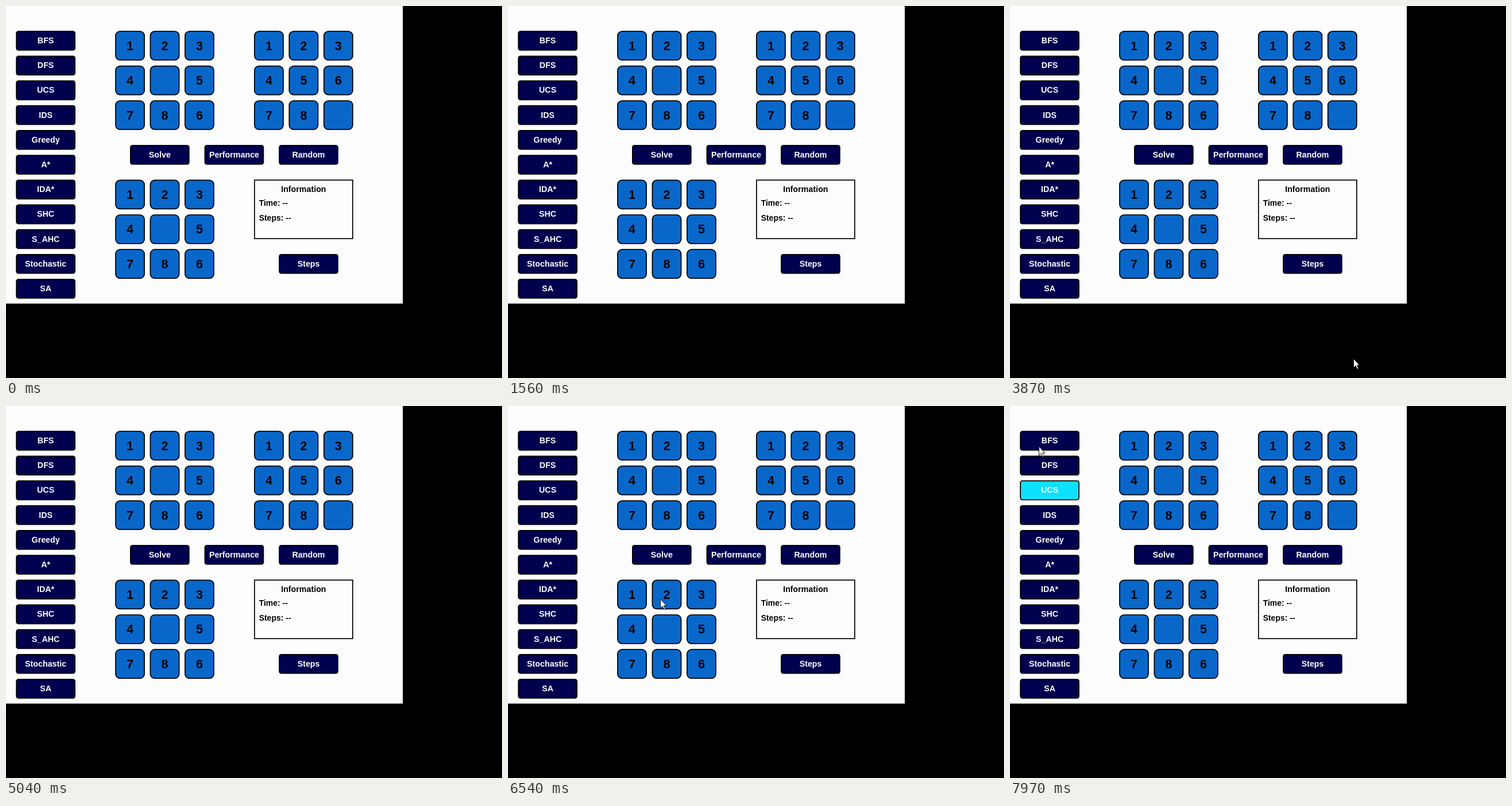
These frames come from a looping animation (864x648 px, 8 s). An HTML page:

```html
<!DOCTYPE html>
<html lang="en">
<head>
<meta charset="utf-8">
<title>Sliding puzzle solver</title>
<style>
  html, body { margin: 0; width: 100%; height: 100%; overflow: hidden; background: #000; }
  svg { display: block; width: 100vw; height: 100vh; }
  text { font-family: "Liberation Sans", Arial, sans-serif; font-weight: bold; }
</style>
</head>
<body>
<svg id="stage" viewBox="0 0 864 648">
  <rect width="864" height="648" fill="#000"/>
  <g id="app" transform="scale(.864)">
    <rect width="800" height="600" fill="#fdfdfd"/>
  </g>
  <path id="cursor" d="M.5 .5V16L4.2 12.7L6.7 18.5L9 17.5L6.6 11.8H11Z"
        fill="#fff" stroke="#000" stroke-width=".9"/>
</svg>
<script>
const LOOP = 8000;
const CLICK = 7300;
const NAVY = '#00004f', CYAN = '#0de1fc', BLUE = '#0967ca';
const app = document.getElementById('app');
const cursor = document.getElementById('cursor');

function add(tag, attrs, content) {
  const el = document.createElementNS('http://www.w3.org/2000/svg', tag);
  for (const key in attrs) el.setAttribute(key, attrs[key]);
  if (content) el.textContent = content;
  app.append(el);
  return el;
}

// The border lies inside the given bounds.
function box(x, y, w, h, r, fill) {
  return add('rect', {
    x: x + 1, y: y + 1, width: w - 2, height: h - 2, rx: r,
    fill, stroke: '#000', 'stroke-width': 2
  });
}

function label(x, y, size, fill, content, anchor = 'middle') {
  add('text', { x, y, fill, 'font-size': size, 'text-anchor': anchor }, content);
}

function button(x, y, name) {
  const el = box(x, y, 120, 40, 4, NAVY);
  label(x + 60, y + 25.2, 16.5, '#fdfdfd', name);
  return el;
}

function board(x, y, tiles) {
  [...tiles].forEach((digit, i) => {
    const tx = x + i % 3 * 70, ty = y + Math.floor(i / 3) * 70;
    box(tx, ty, 60, 60, 9, BLUE);
    if (digit !== '0') label(tx + 30, ty + 38.6, 25, '#000', digit);
  });
}

const methods = ['BFS', 'DFS', 'UCS', 'IDS', 'Greedy', 'A*', 'IDA*', 'SHC', 'S_AHC', 'Stochastic', 'SA']
  .map((name, i) => button(20, 50 + i * 50, name));
const chosen = methods[2];

board(220, 50, '123405786');
board(500, 50, '123456780');
board(220, 350, '123405786');

['Solve', 'Performance', 'Random'].forEach((name, i) => button(250 + i * 150, 280, name));
button(550, 500, 'Steps');

box(500, 350, 200, 120, 0, '#fdfdfd');
label(600, 375, 16.5, '#000', 'Information');
label(510, 402.8, 16.2, '#000', 'Time: --', 'start');
label(510, 432.9, 16.2, '#000', 'Steps: --', 'start');

// Each visit of the pointer: [time, x, y] points.
const visits = [
  [[300, 760, 648], [830, 827, 40], [950, 847, 6]],
  [[2500, 552, 500], [2850, 559, 582], [3400, 559, 582], [3800, 598, 614], [4250, 598, 614], [4700, 826, 648]],
  [[5350, 864, 497], [5870, 758, 450], [6500, 265, 336], [6680, 265, 336], [7220, 50, 142], [7500, 50, 142], [7920, 50, 70], [LOOP, 50, 70]]
];

const ease = u => u * u * (3 - 2 * u);

function pointerAt(t) {
  const path = visits.find(v => t >= v[0][0] && t <= v[v.length - 1][0]);
  if (!path) return null;
  const i = path.findIndex(p => p[0] >= t);
  if (i < 1) return path[0].slice(1);
  const [t0, x0, y0] = path[i - 1], [t1, x1, y1] = path[i];
  const u = ease((t - t0) / (t1 - t0));
  return [x0 + (x1 - x0) * u, y0 + (y1 - y0) * u];
}

function draw(t) {
  const pos = pointerAt(t);
  cursor.setAttribute('visibility', pos ? 'visible' : 'hidden');
  if (pos) cursor.setAttribute('transform', `translate(${pos.map(Math.round)})`);
  chosen.setAttribute('fill', t >= CLICK ? CYAN : NAVY);
}

const start = performance.now();
function tick() {
  draw((performance.now() - start) % LOOP);
  requestAnimationFrame(tick);
}
draw(0);
requestAnimationFrame(tick);
</script>
</body>
</html>
```
